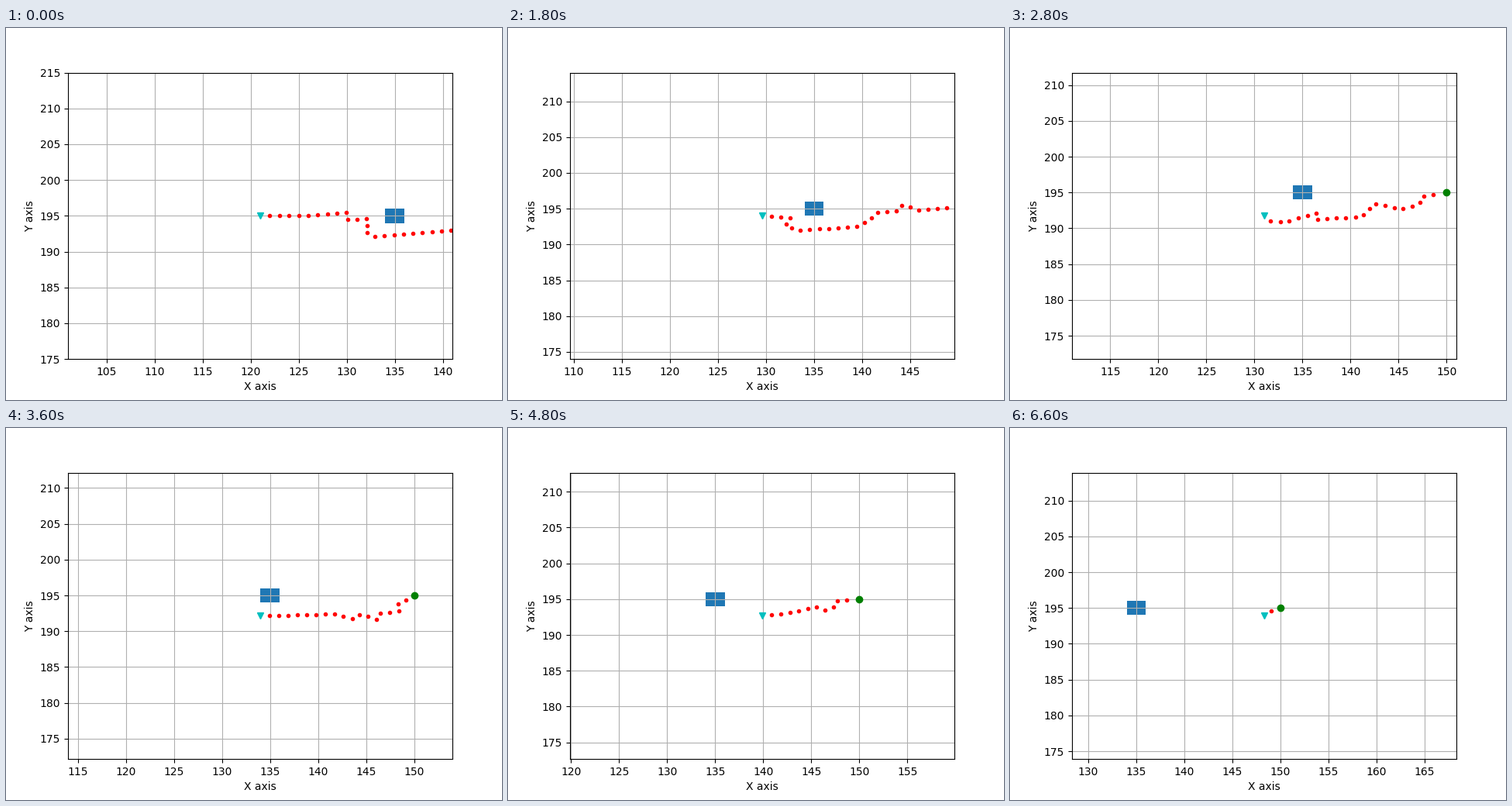
A matplotlib script for the animation above (6.8 s loop, 640 px wide and 480 px high).

```python
import numpy as np
import matplotlib.pyplot as plt
from matplotlib.animation import FuncAnimation
from matplotlib.patches import Rectangle

STEPS = 34
REACH = 20
GOAL = np.array([150.0, 195.0])


def route(dots, *corners):
    """Robot position, then evenly spaced waypoints along the corners."""
    x, y = np.transpose(corners)
    dist = np.append(0, np.cumsum(np.hypot(np.diff(x), np.diff(y))))
    s = np.linspace(0, dist[-1], dots + 1)
    return np.column_stack([np.interp(s, dist, x), np.interp(s, dist, y)])


# Main turns of the plan at a few steps; one waypoint is used up per step.
plans = {
    0: route(32, (121, 195), (126, 195), (130, 195.5), (130.1, 194.5),
             (132.1, 194.6), (132.1, 192.6), (133, 192.1), (141, 193),
             (149.66, 194.9)),
    9: route(23, (129.6, 194), (132.5, 193.8), (132, 192.6), (133.2, 192),
             (139.7, 192.5), (141.7, 194.5), (143.6, 194.7), (144.2, 195.6),
             (145.8, 194.8), (148.8, 195.1)),
    14: route(21, (131.03, 191.735), (131.7, 191), (133.2, 190.9),
              (136.5, 192.1), (136.5, 191.25), (141.1, 191.6),
              (142.5, 193.4), (145.4, 192.7), (147.1, 193.4),
              (147.6, 194.5), (148.6, 194.7)),
    18: route(18, (133.96, 192.15), (141.8, 192.4), (143.6, 191.75),
              (144.4, 192.4), (146.1, 191.65), (146.5, 192.5),
              (148.4, 192.85), (148.3, 193.8), (149.1, 194.35)),
    24: route(10, (139.908, 192.669), (143, 193.15), (145.5, 193.95),
              (146.5, 193.5), (147.3, 193.9), (147.7, 194.8),
              (148.7, 194.9)),
    28: route(6, (143.55, 192.58), (144.1, 193.4), (145.5, 194.4),
              (146.8, 194.5), (147.7, 195), (148.6, 194.8)),
    33: route(1, (148.31, 193.9), (149.05, 194.6)),
}


def pad(path, size):
    """Extend a path to the given size by resting at the goal."""
    return np.vstack([path, np.tile(GOAL, (size - len(path), 1))])


def plan_at(step):
    """Follow the latest plan while easing it into the next one."""
    if step in plans:
        return plans[step]
    start = max(k for k in plans if k < step)
    end = min(k for k in plans if k > step)
    done, span = step - start, end - start
    old, new = plans[start], plans[end]
    drift = new[0] - old[span]
    now = old[done:]
    later = np.vstack([old[done:span] + drift, new])
    size = max(len(now), len(later))
    t = done / span
    return (1 - t) * pad(now, size) + t * pad(later, size)


fig, ax = plt.subplots(figsize=(6.4, 4.8), dpi=100)
ax.grid(True)
ax.set_xlabel("X axis")
ax.set_ylabel("Y axis")
ax.add_patch(Rectangle((134, 194), 2, 2))
robot, = ax.plot([], [], "cv")
dots, = ax.plot([], [], "r.")
ax.plot(*GOAL, "go")


def update(step):
    path = plan_at(step)
    x, y = path[0]
    robot.set_data([x], [y])
    dots.set_data(path[1:, 0], path[1:, 1])
    ax.set_xlim(x - REACH, x + REACH)
    ax.set_ylim(y - REACH, y + REACH)
    return robot, dots


anim = FuncAnimation(fig, update, frames=STEPS, interval=200, repeat=True)
plt.show()
```
